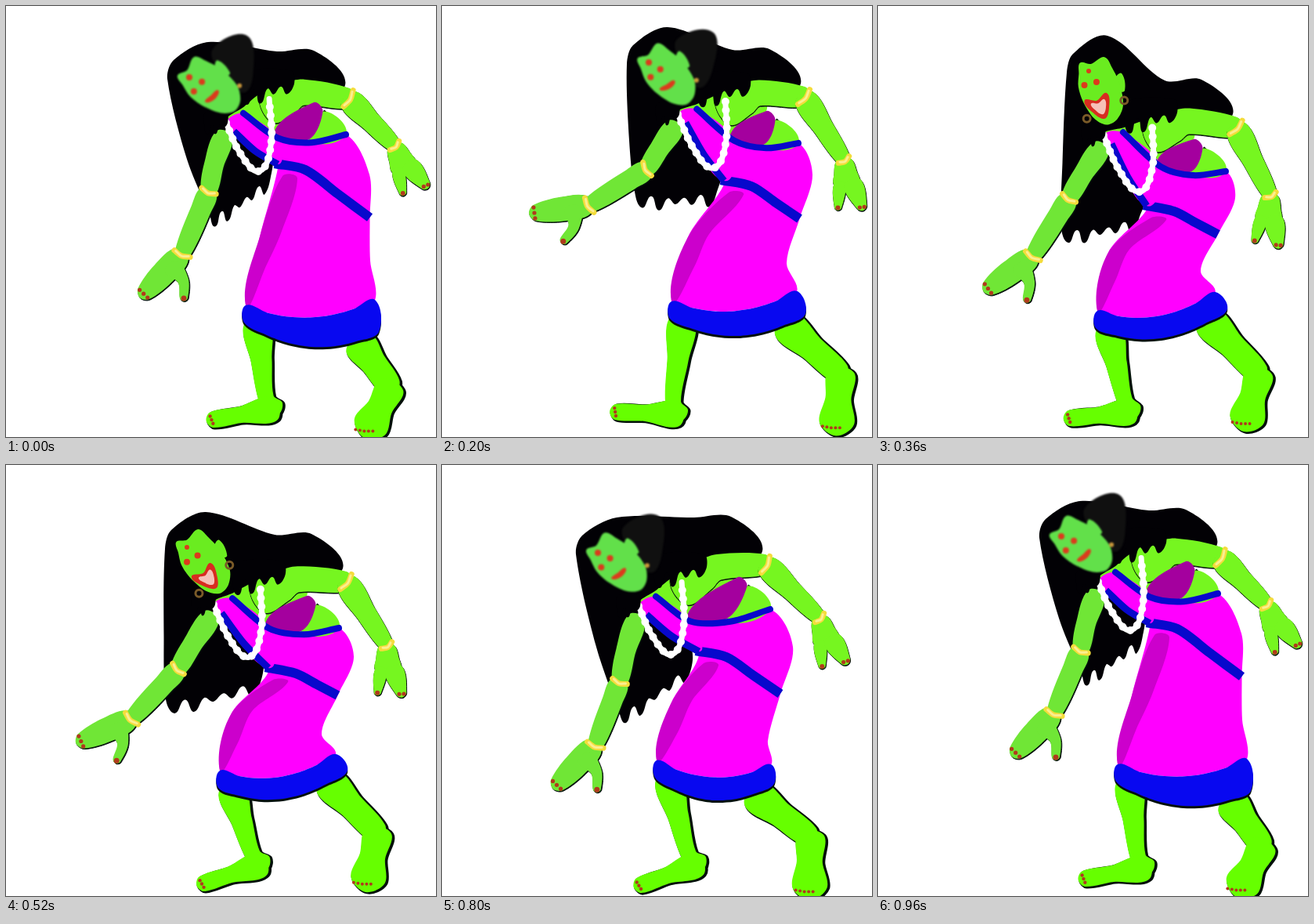
Write an HTML page that moves like this. It is 549x550 px and loops after 1 s.

```html
<!DOCTYPE html>
<html lang="en">
<head>
<meta charset="utf-8">
<title>Walking figure</title>
<style>
html, body { margin: 0; width: 100%; height: 100%; overflow: hidden; background: #fff; }
svg { display: block; width: 100vw; height: 100vh; }
.soft { filter: blur(0.9px); }
</style>
</head>
<body>
<svg id="stage" viewBox="0 0 549 550"></svg>
<script>
const LOOP = 1000, STEP = 40, CYCLE = 960;
const KEYS = [0, 200, 360, 520, 600, 640, 800];

// Driving joints as points, bones of fixed length as angles; one value per key pose
const rig = {
  brow: '234,91 264,72 269,83 231,105 207,113 199,112',
  tilt: '40 51 75 58 46 45',
  neckL: '281,149 301,138 288,165 265,178 255,180 251,180',
  collar: '-29 -15 -9 -18 -26 -29',
  tip: '278,278 264,249 252,295 222,311 208,318 244,327',
  elbowR: '437,118 462,116 457,155 434,149 420,134 413,127',
  wristR: '496,178 513,196 501,241 486,230 480,212 482,195',
  handR: '66 83 95 87 80 73',
  elbowL: '259,236 262,208 244,245 220,260 209,267 227,276',
  foreL: '113 148 122 133 134 111',
  handL: '134 172 144 156 159 134',
  belly: '347,207 360,228 343,260 335,264 331,256 328,243',
  waist: '434,164 455,175 444,211 425,208 417,196 419,184',
  hip: '464,215 473,215 456,245 444,245 441,240 448,232',
  knee: '465,325 440,328 412,338 403,343 404,353 416,352',
  hemR: '476,416 464,393 446,387 436,390 431,392 424,407',
  hemL: '306,382 293,377 280,389 273,390 273,388 274,377',
  ankleL: '332,500 295,505 315,503 315,497 312,497 315,497',
  footL: '158 170 162 150 148 148',
  ankleR: '490,487 507,470 485,470 473,470 470,470 468,475',
  footR: '130 109 119 116 110 105'
};
for (const name in rig) {
  const poses = rig[name].split(' ').map(s => s.split(',').map(Number));
  // furthest reach just before the swing back
  const reach = poses[4].map((v, i) => v - 0.15 * (poses[5][i] - v));
  poses.splice(4, 0, reach);
  rig[name] = poses;
}

// Periodic cubic through the key poses
function valueAt(track, t) {
  const n = KEYS.length;
  const time = i => KEYS[(i + n) % n] + Math.floor(i / n) * CYCLE;
  const at = i => track[(i + n) % n];
  let k = n - 1;
  while (KEYS[k] > t) k--;
  const span = time(k + 1) - time(k), u = (t - time(k)) / span, v = 1 - u;
  return track[0].map((_, c) => {
    const slope = i => (at(i + 1)[c] - at(i - 1)[c]) / (time(i + 1) - time(i - 1)) * span;
    return at(k)[c] * (1 + 2 * u) * v * v + slope(k) * u * v * v
      + at(k + 1)[c] * u * u * (3 - 2 * u) - slope(k + 1) * u * u * v;
  });
}

// Points
const off = (p, x, y) => [p[0] + x, p[1] + y];
const mix = (a, b, s = 0.5) => [a[0] + (b[0] - a[0]) * s, a[1] + (b[1] - a[1]) * s];
const polar = (p, deg, len) => off(p, len * Math.cos(deg * Math.PI / 180), len * Math.sin(deg * Math.PI / 180));
const angle = (a, b) => Math.atan2(b[1] - a[1], b[0] - a[0]) * 180 / Math.PI;
const dist = (a, b) => Math.hypot(b[0] - a[0], b[1] - a[1]);

// A sagging row of points from a to b
const sag = (a, b, depth, n = 6) => Array.from({ length: n + 1 }, (_, i) => {
  const s = i / n;
  return off(mix(a, b, s), 0, 4 * depth * s * (1 - s));
});

// Ragged ends of hair hanging from a to b
function drips(a, b, count, length, bulge) {
  return sag(a, b, bulge, count * 2).map((p, i) =>
    i % 2 ? off(p, -1, length * (0.75 + 0.35 * Math.sin(i * 2.3))) : p);
}

// Outline of a limb along a spine, with a width at each spine point
function tube(spine, widths) {
  const last = spine.length - 1, left = [], right = [];
  spine.forEach((p, i) => {
    const a = angle(spine[Math.max(0, i - 1)], spine[Math.min(last, i + 1)]);
    left.push(polar(p, a - 90, widths[i] / 2));
    right.unshift(polar(p, a + 90, widths[i] / 2));
  });
  const cap = polar(spine[last], angle(spine[last - 1], spine[last]), widths[last] * 0.35);
  return [...left, cap, ...right];
}

const xy = p => p[0].toFixed(1) + ',' + p[1].toFixed(1);

function smooth(pts, closed) {
  const n = pts.length;
  const at = i => closed ? pts[(i + n) % n] : pts[Math.max(0, Math.min(n - 1, i))];
  const handle = (i, side) => {
    const len = dist(at(i), at(i + side)) * 0.3;
    return polar(at(i), angle(at(i - 1), at(i + 1)), side * len);
  };
  let d = 'M' + xy(pts[0]);
  for (let i = 0; i < (closed ? n : n - 1); i++) {
    d += 'C' + [handle(i, 1), handle(i + 1, -1), at(i + 1)].map(xy).join(' ');
  }
  return d + (closed ? 'Z' : '');
}

// Drawing
const BLUE = '#0808f0', BAND = '#0808cc', PINK = '#ff00ff', INK = '#03100a', HAIR = '#020105';
const SKIN = '#76f620', LEG = '#66ff00', ARM = '#70e636', GOLD = '#f4dc3c', NAIL = '#b03a1c', RED = '#dc3a1c';

const svg = document.getElementById('stage');
let out = [];
const fill = (pts, color) => out.push(`<path d="${smooth(pts, true)}" fill="${color}"/>`);
const line = (pts, color, width, extra = '') => out.push(
  `<path d="${smooth(pts)}" fill="none" stroke="${color}" stroke-width="${width}" ${extra}/>`);
const dot = (p, color, r) => out.push(`<circle cx="${p[0]}" cy="${p[1]}" r="${r}" fill="${color}"/>`);

// Joined shapes sharing one dark edge, heavier toward (dx, dy)
function inked(shapes, color, dx, dy, weight) {
  for (const s of shapes) {
    out.push(`<path d="${smooth(s, true)}" fill="${INK}" stroke="${INK}" stroke-width="${weight}" transform="translate(${dx},${dy})"/>`);
  }
  shapes.forEach(s => fill(s, color));
}

function cuff(p, dir, half) {
  const arc = r => [polar(p, dir - 90, r), polar(p, dir, 3), polar(p, dir + 90, r)];
  line(arc(half), GOLD, 7, 'stroke-linecap="round"');
  line(arc(half - 2), '#fbee90', 3, 'stroke-linecap="round"');
}

function hair(j) {
  fill([j.hairR, off(j.elbowR, -44, -61), off(j.elbowR, -91, -60),
    off(j.brow, 24, -45), off(j.brow, -20, -22), off(j.brow, -28, 2),
    off(mix(off(j.brow, -28, 2), j.tip), -11, 10),
    ...drips(off(j.tip, -18, -12), off(j.belly, -8, 6), 5, 17, 10),
    j.bust, j.armMid], HAIR);
}

function leftArm(j) {
  const wrist = polar(j.elbowL, j.foreL, 87);
  const finger = polar(wrist, j.handL, 71), thumb = polar(wrist, j.handL - 46, 57);
  const palm = mix(wrist, finger, 0.5);
  inked([
    tube([off(j.neckL, -2, 14), mix(j.shoulderL, j.elbowL), j.elbowL], [22, 25, 21]),
    tube([j.elbowL, mix(j.elbowL, wrist, 0.3), wrist], [21, 26, 20]),
    tube([wrist, palm, finger], [22, 31, 20]),
    tube([mix(wrist, palm, 0.6), mix(wrist, thumb, 0.6), thumb], [20, 14, 10])
  ], ARM, 1, 1, 1);
  cuff(j.elbowL, j.foreL, 10);
  cuff(wrist, j.foreL, 11);
  for (let i = -1; i <= 1; i++) dot(polar(finger, j.handL + 90, i * 7), NAIL, 2.6);
  dot(thumb, NAIL, 3.5);
}

function legs(j) {
  const toe = polar(j.ankleL, j.footL, 75), heel = polar(j.ankleL, j.footL - 108, 18);
  inked([
    tube([j.legL, mix(j.legL, j.ankleL, 0.5), j.ankleL, heel], [32, 27, 20, 24]),
    tube([heel, mix(heel, toe, 0.55), toe], [30, 21, 20])
  ], LEG, 2, 1, 3);
  for (let i = -1; i <= 1; i++) dot(polar(toe, j.footL + 90, i * 5), NAIL, 2.2);

  const toeR = polar(j.ankleR, j.footR, 71), sole = off(toeR, 20, -4);
  const ankle = off(j.ankleR, 1, -1);
  inked([
    tube([j.legR, mix(j.legR, ankle, 0.5), ankle], [36, 33, 28]),
    tube([off(ankle, 2, -3), mix(ankle, sole, 0.5), sole], [32, 33, 44])
  ], LEG, 2, 1, 3);
  for (let i = 0; i < 5; i++) dot(off(toeR, 2 + i * 5.5, Math.min(i, 2) - 1), NAIL, 2);
}

function skirt(j) {
  const hem = sag(j.hemRT, j.hemL, 19), edge = sag(j.hemLB, j.hemR, 25);
  const hemBand = [...hem, ...edge];
  fill([j.bust, j.neckMid, j.waist, j.hip, j.seat, j.knee, ...hem, j.front, j.belly], PINK);
  fill([off(j.belly, 6, 10), j.front, j.hemL, off(j.front, 8, 38), off(j.front, 27, -4), off(j.belly, 25, 13)], '#cc00cc');
  inked([hemBand], BLUE, 0, 3, 0);
  line([off(j.belly, -4, -6), j.band, mix(j.band, j.seat), j.seat], BAND, 12);
}

function chest(j) {
  const back = mix(j.back, j.waist, 0.28), low = off(mix(j.bust, j.waist, 0.45), 0, 4);
  fill([j.neckL, mix(j.neckL, off(j.neckR, -10, -10), 0.5), off(j.neckR, -4, -10), j.armMid, j.back, j.bust], SKIN);
  inked([tube([off(j.neckR, -4, 12), off(mix(j.neckR, j.armMid, 0.6), 0, 3), j.armMid, j.elbowR], [40, 40, 33, 26])], SKIN, 0, 1, 1);
  line([off(back, 1, -1), off(j.waist, 1, -2)], INK, 3);
  fill([back, j.waist, low], SKIN);
  fill([off(j.bust, -5, -5), j.back, back, low], '#a4009e');
  fill([j.neckL, mix(j.neckL, j.neckR, 0.38), j.bust, off(j.belly, 0, -5), off(j.neckL, 14, 18)], PINK);
  line([off(j.neckL, 10, 11), off(mix(j.neckL, j.belly), 4, 7), off(j.belly, 0, -5)], BAND, 9);
  line([mix(j.neckL, j.neckR, 0.4), j.bust, j.neckMid, j.waist], BAND, 8, 'stroke-linecap="round"');
}

function rightHand(j) {
  const palm = polar(j.wristR, j.handR, 30), dir = angle(j.elbowR, j.wristR);
  const thumb = polar(j.wristR, j.handR + 14, 62), finger = polar(j.wristR, j.handR - 14, 65);
  inked([
    tube([j.elbowR, mix(j.elbowR, j.wristR), j.wristR], [26, 26, 18]),
    tube([j.wristR, mix(j.wristR, palm, 0.6), palm], [18, 30, 33]),
    tube([polar(palm, j.handR + 90, 9), thumb], [14, 9]),
    tube([polar(palm, j.handR - 90, 7), finger], [22, 13])
  ], SKIN, 0.5, 1, 1);
  cuff(j.elbowR, angle(j.armMid, j.wristR), 12);
  cuff(j.wristR, dir, 8);
  dot(thumb, NAIL, 3);
  for (const side of [-3, 3]) dot(polar(finger, j.handR + 90, side), NAIL, 2.6);
}

function necklace(j) {
  const low = off(mix(j.neckL, j.neckR), 15, 77);
  const string = [j.neckL, off(mix(j.neckL, low, 0.55), -6, 4), low, off(mix(low, j.neckR, 0.4), 10, 0), j.neckR];
  line(string, '#fff', 7, 'stroke-linecap="round"');
  line(string, '#fff', 10, 'stroke-linecap="round" stroke-dasharray="0 11"');
}

function locks(j) {
  const a = off(j.neckR, -36, -12), b = off(j.neckR, 32, -20);
  fill([off(a, 4, -22), off(b, -4, -16), ...drips(a, b, 4, 19, 3).reverse()], HAIR);
  const c = off(j.neckL, -28, 2), d = off(j.neckL, 2, 0);
  fill([off(c, 2, -16), off(d, -2, -14), ...drips(c, d, 3, 12, 2).reverse()], HAIR);
}

function head(j, laughing) {
  // face coordinates: down from the brow, then toward the ear
  const at = (down, side) => polar(polar(j.brow, j.tilt, down), j.tilt - 90, side);
  const place = text => text.split(' ').map(s => at(...s.split(',').map(Number)));
  const skin = laughing ? '#6aec20' : '#62e04a';
  out.push(laughing ? '<g>' : '<g class="soft">');
  if (!laughing) fill(place('0,46 22,88 58,58 66,30 30,30'), '#101010');
  fill(place('18,30 14,40 36,38 34,30'), skin);
  fill(place('-13,-8 -8,5 -12,24 4,30 27,34 54,31 69,19 72,4 60,-9 36,-17 16,-18 0,-13'), skin);
  dot(at(0, 0), RED, laughing ? 3 : 4);
  dot(at(16, -10), RED, 4);
  dot(at(16, 6), RED, 4);
  if (laughing) {
    fill(place('35,-15 39,0 33,15 52,13 64,4 52,-9'), '#d82c20');
    fill(place('41,-8 43,1 40,10 51,9 58,3 50,-5'), '#f6c0b8');
    for (const p of [at(58, -18), at(48, 34)]) {
      out.push(`<circle cx="${p[0]}" cy="${p[1]}" r="4.5" fill="none" stroke="#7a5a28" stroke-width="3"/>`);
    }
  } else {
    fill(place('36,-11 36,0 39,11 43,1'), RED);
    dot(at(56, 33), '#c8963a', 3);
  }
  out.push('</g>');
}

function pose(t) {
  const j = {};
  for (const name in rig) {
    const v = valueAt(rig[name], t);
    j[name] = v.length > 1 ? v : v[0];
  }
  j.neckR = polar(j.neckL, j.collar, 63);
  j.shoulderL = off(j.neckL, -9, 20);
  j.hairR = off(j.elbowR, -4, -17);
  j.armMid = off(mix(j.neckR, j.elbowR), -6, -8);
  j.bust = off(j.neckR, 11, 50);
  j.back = off(j.waist, -41, -41);
  j.neckMid = off(mix(j.bust, j.waist), 0, 8);
  j.band = off(j.belly, 35, 2);
  j.seat = mix(j.hip, j.knee);
  j.hemRT = mix(j.knee, j.hemR, 0.55);
  j.hemLB = off(j.hemL, -2, 22);
  j.legL = off(j.hemLB, 16, 0);
  j.legR = off(j.hemR, -27, 12);
  // bent knees push the front of the skirt out
  const bend = j.knee[0] - mix(j.hip, j.hemR)[0];
  j.front = off(mix(j.belly, j.hemL), bend * 0.45, bend * 0.25);
  return j;
}

function draw(t) {
  const j = pose(t);
  out = [];
  hair(j);
  leftArm(j);
  legs(j);
  skirt(j);
  chest(j);
  rightHand(j);
  necklace(j);
  locks(j);
  head(j, t >= 280 && t < 720);
  svg.innerHTML = out.join('');
}

let shown = -1;
function tick() {
  const t = Math.floor(performance.now() % LOOP / STEP) * STEP % CYCLE;
  if (t !== shown) draw(shown = t);
  requestAnimationFrame(tick);
}
tick();
</script>
</body>
</html>
```
